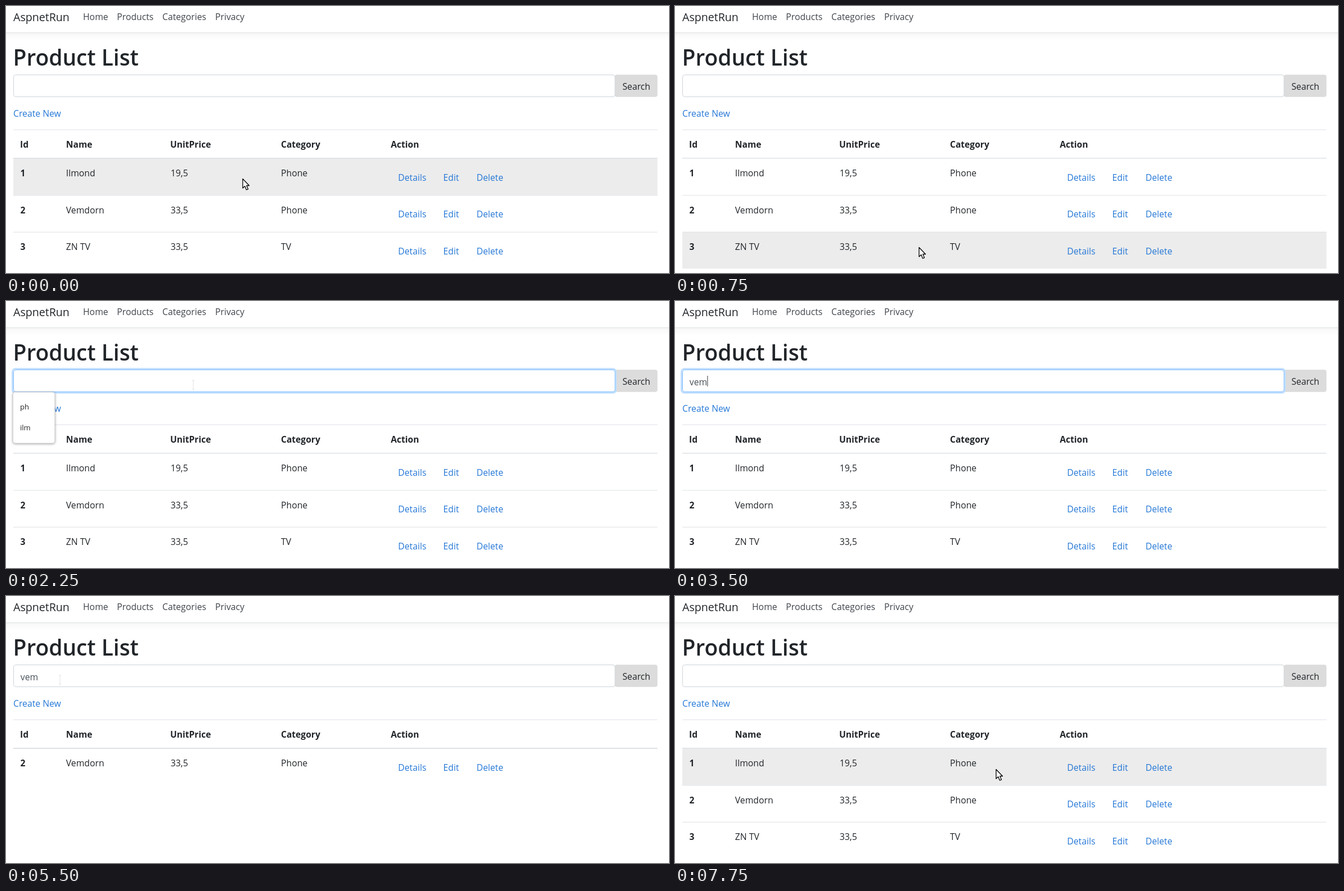
An HTML page that plays this animation: 1179 by 475 pixels, repeating every 8000 ms.

```html
<!DOCTYPE html>
<html lang="en">
<head>
<meta charset="utf-8">
<title>Product List</title>
<style>
  html, body { margin: 0; width: 100%; height: 100%; overflow: hidden; background: #fff; }
  svg { display: block; width: 1179px; height: 475px; }
  text { font: 15.75px "Open Sans", "Noto Sans", sans-serif; fill: #212529; }
  .nav { fill: #3f444a; }
  .brand { font-size: 19.6px; }
  .title { font-size: 38.9px; font-weight: 600; }
  .bold { font-size: 15.6px; font-weight: 700; }
  .link { fill: #2477d6; }
  .typed { fill: #495057; }
  .hint { font-size: 13px; font-weight: 500; fill: #222; }
  .line { fill: #dee2e6; }
  .bar { fill: #fff; filter: drop-shadow(0 4px 6px rgba(0, 0, 0, .05)); }
  .menu { fill: #fff; stroke: #c8c8c8; stroke-width: .8; filter: drop-shadow(0 1px 2px rgba(0, 0, 0, .35)); }
  .cursor { fill: #fff; stroke: #000; stroke-width: 1.3; stroke-linejoin: round; }
</style>
</head>
<body>
<svg id="stage" viewBox="0 0 1179 475"></svg>
<script>
const LOOP = 8000;
const ROW_TOP = 271, ROW_HEIGHT = 65.4;
const LEFT = 13, RIGHT = 1158.5;
const stage = document.getElementById("stage");

function add(parent, tag, attrs, content = "") {
  const el = document.createElementNS("http://www.w3.org/2000/svg", tag);
  for (const key in attrs) el.setAttribute(key, attrs[key]);
  el.textContent = content;
  parent.append(el);
  return el;
}
const group = () => add(stage, "g", {});
const label = (parent, x, y, content, cls = "") => add(parent, "text", { x, y, class: cls }, content);
const box = (parent, x, y, width, height, attrs) => add(parent, "rect", { x, y, width, height, ...attrs });
const show = (el, on) => el.setAttribute("visibility", on ? "visible" : "hidden");

// Page header
box(stage, -20, -20, 1219, 67, { class: "bar" });
box(stage, 0, 47, 1179, 1, { class: "line" });
label(stage, 13, 27, "AspnetRun", "brand");
[[137, "Home"], [197.3, "Products"], [278, "Categories"], [372, "Privacy"]]
  .forEach(([x, name]) => label(stage, x, 25, name, "nav"));
label(stage, 12.5, 106, "Product List", "title");

// Search form
box(stage, 1082.5, 122.3, 76, 39.4, { rx: 4, fill: "#dcdcdc" });
label(stage, 1096.2, 148.7, "Search");
const ring = box(stage, 11.5, 120.8, 1073, 42.4, { rx: 5, fill: "none", stroke: "#bfdeff", "stroke-width": 3 });
const field = box(stage, 13.5, 122.5, 1069.5, 39, { rx: 4, fill: "#fff" });
const typed = label(stage, 25.8, 149.6, "", "typed");
const caret = box(stage, 26, 133, 1, 19, { fill: "#333" });
label(stage, 13, 197.4, "Create New", "link");

// Product table
box(stage, LEFT, 219.6, RIGHT - LEFT, 1, { class: "line" });
[[25, "Id"], [106.8, "Name"], [292, "UnitPrice"], [489, "Category"], [684.3, "Action"]]
  .forEach(([x, name]) => label(stage, x, 252, name, "bold"));

const products = [
  ["1", "Ilmond", "19,5", "Phone"],
  ["2", "Vemdorn", "33,5", "Phone"],
  ["3", "ZN TV", "33,5", "TV"]
];
const rows = products.map(([id, name, price, category], i) => {
  const g = group();
  const shade = box(g, LEFT, 0, RIGHT - LEFT, ROW_HEIGHT, { fill: "#ececec" });
  if (i) box(g, LEFT, 0, RIGHT - LEFT, 1, { class: "line" });
  label(g, 25.5, 32.4, id, "bold");
  label(g, 106.8, 32.4, name);
  label(g, 292.8, 32.4, price);
  label(g, 489, 32.4, category);
  [[697.3, "Details"], [777.5, "Edit"], [836.7, "Delete"]]
    .forEach(([x, action]) => label(g, x, 39.8, action, "link"));
  return { g, shade };
});
box(stage, LEFT, 270, RIGHT - LEFT, 1.5, { class: "line" });

// Suggestions
const menu = group();
box(menu, 12.3, 162, 74.6, 91, { rx: 4, class: "menu" });
label(menu, 25, 193, "ph", "hint");
label(menu, 25, 230, "ilm", "hint");

// Pointers, each drawn from its top left corner
const shapes = {
  arrow: "M.5 .5V17L4.3 13.6L7 20L10 18.8L7.3 12.5H12Z",
  hand: "M4.5 13V2.7Q4.5 .8 6.1 .8T7.7 2.7V8.2Q10.2 7.3 10.7 9Q12.9 8.2 13.3 10Q15.7 9.5 15.7 11.8V16Q15.7 19 14 21V24.2H6.5V21.6Q4.6 19.3 .9 13.2Q0 11.4 1.4 10.8Q2.7 10.5 4.5 13Z" +
        "M7.7 8.2V13M10.7 9V13M13.3 10V13",
  beam: "M-2 0H2M0 0V16M-2 16H2"
};
const cursors = {};
for (const kind in shapes) cursors[kind] = add(stage, "path", { d: shapes[kind], class: "cursor" });
cursors.beam.setAttribute("style", "stroke: #e2e2e2; stroke-width: 1");

// time, pointer, x, y, typed text, flags: f focus, m menu, c caret, r filtered
const steps = [
  [0, "arrow", 420.5, 307, "", ""],
  [250, "arrow", 424, 343, "", ""],
  [500, "arrow", 427, 377, "", ""],
  [750, "arrow", 433.5, 429, "", ""],
  [1000, "arrow", 412, 300, "", ""],
  [1250, "arrow", 362, 169, "", ""],
  [1500, "beam", 333, 141, "", ""],
  [1750, "beam", 333, 141, "", "fmc"],
  [2250, "beam", 333, 141, "", "fm"],
  [2500, "", 0, 0, "v", "fc"],
  [2750, "", 0, 0, "v", "f"],
  [3250, "", 0, 0, "ve", "fc"],
  [3500, "", 0, 0, "vem", "fc"],
  [3750, "beam", 520, 146, "vem", "f"],
  [4000, "arrow", 860, 167, "vem", "f"],
  [4250, "hand", 1100, 141.5, "vem", "f"],
  [4500, "hand", 1100, 141.5, "vem", "r"],
  [4750, "arrow", 1020, 180, "vem", "r"],
  [5000, "arrow", 660, 196, "vem", "r"],
  [5250, "arrow", 260, 178, "vem", "r"],
  [5500, "beam", 96, 141, "vem", "r"],
  [5750, "beam", 96, 141, "vem", "frc"],
  [6250, "", 0, 0, "", "frc"],
  [6500, "beam", 690, 141, "", "fr"],
  [6750, "hand", 1142, 143.5, "", "fr"],
  [7000, "hand", 1142, 143.5, "", "r"],
  [7250, "hand", 1142, 143.5, "", ""],
  [7500, "arrow", 850, 225, "", ""],
  [7750, "arrow", 570.5, 308, "", ""]
];

function render(time) {
  const [, pointer, x, y, text, flags] = steps.findLast(step => step[0] <= time);
  const has = flag => flags.includes(flag);

  show(ring, has("f"));
  field.setAttribute("stroke", has("f") ? "#80bdff" : "#ced4da");
  typed.textContent = text;
  show(caret, has("c"));
  caret.setAttribute("x", 26 + (text ? typed.getComputedTextLength() : 0));
  show(menu, has("m"));

  const hovered = pointer === "arrow" ? Math.floor((y - ROW_TOP) / ROW_HEIGHT) : -1;
  rows.forEach(({ g, shade }, i) => {
    const place = has("r") ? i - 1 : i;
    g.setAttribute("display", has("r") && i !== 1 ? "none" : "inline");
    g.setAttribute("transform", `translate(0 ${ROW_TOP + place * ROW_HEIGHT})`);
    show(shade, place === hovered);
  });

  for (const kind in cursors) {
    show(cursors[kind], kind === pointer);
    cursors[kind].setAttribute("transform", `translate(${x} ${y})`);
  }
}

const start = performance.now();
function tick() {
  render((performance.now() - start) % LOOP);
  requestAnimationFrame(tick);
}
tick();
</script>
</body>
</html>
```
